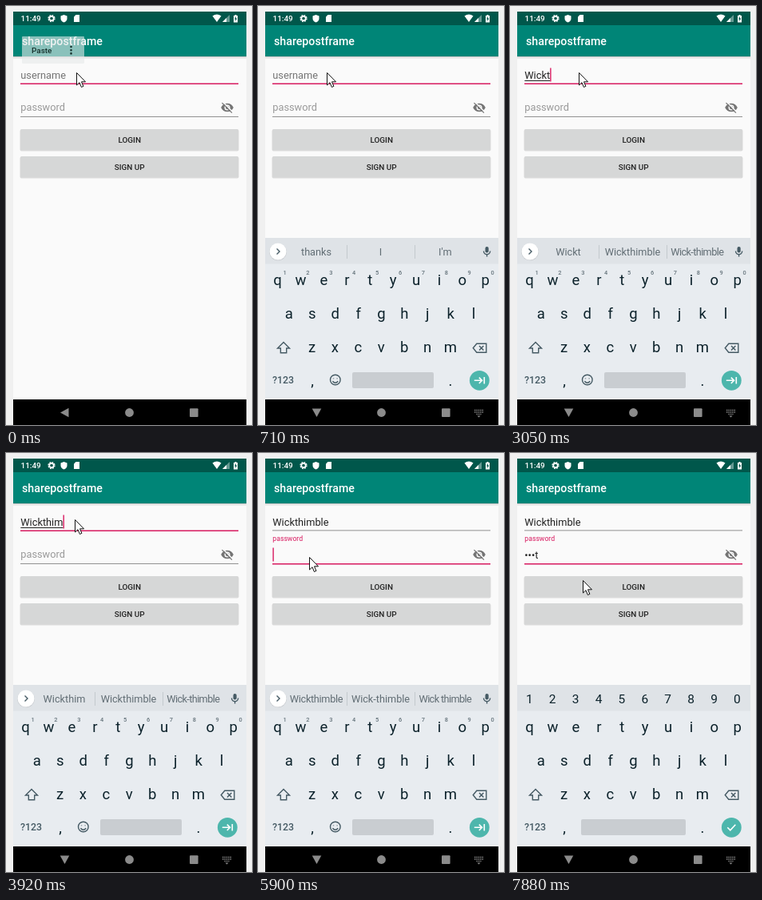
An HTML page that plays this animation: 308x524 px, repeating every 8 s.

```html
<!DOCTYPE html>
<html lang="en">
<head>
<meta charset="utf-8">
<title>Login screen</title>
<style>
  html, body { margin: 0; width: 100%; height: 100%; overflow: hidden; background: #f0f0f0; }
  svg { display: block; font-family: Roboto, sans-serif; }
  text { white-space: pre; }
  .field { font-size: 12.78px; fill: #212121; }
  .medium { font-size: 9.94px; font-weight: 500; }
  .mid { text-anchor: middle; }
  .key { font-size: 18.5px; fill: #0c222b; }
  .digit { font-size: 15.5px; fill: #0c222b; }
  .super { font-size: 7.4px; font-weight: 500; fill: #66747c; }
  .word { font-size: 12.7px; fill: #616d74; }
  .line { fill: none; stroke: #455a64; stroke-width: 1.4; }
</style>
</head>
<body>
<svg id="stage" width="308" height="524" viewBox="0 0 308 524">
  <rect x="9" y="7" width="292" height="517" fill="#fafafa"/>
  <rect x="9" y="63" width="292" height="1" fill="#000" opacity=".22"/>
  <rect x="9" y="64" width="292" height="2" fill="#000" opacity=".06"/>
  <rect x="9" y="24" width="292" height="39" fill="#008577"/>
  <rect x="9" y="7" width="292" height="17" fill="#00574b"/>

  <g fill="#fff">
    <text class="medium" x="18.5" y="19">11:49</text>
    <circle cx="57" cy="15.5" r="2.7" fill="none" stroke="#fff" stroke-width="1.7"/>
    <circle cx="57" cy="15.5" r="4" fill="none" stroke="#fff" stroke-width="1.3" stroke-dasharray="1.9 1.24"/>
    <path d="M72.5 11l4 1.5v3q0 3.500-4 5q-4-1.500-4-5v-3z"/>
    <path d="M87.500 11h4.500v9h-7v-6.500z"/>
    <path d="M258.500 12.500q5.500-4 11 0l-5.500 7.500z"/>
    <path d="M280 11v9h-9z" opacity=".4"/>
    <path d="M276 15v5h-5z"/>
    <path d="M285 12h1.500v-1h2v1h1.500v8.500h-5z"/>
    <path d="M288 13l-2 3.500h1.300v2.500l2-3.500h-1.300z" fill="#00574b"/>
    <text x="20" y="49" font-size="14.2" font-weight="500">sharepostframe</text>
  </g>

  <g id="popup">
    <rect x="20" y="38" width="78" height="34" rx="1" fill="#e6eae9" opacity=".6"/>
    <text class="medium" x="32" y="59" fill="#16302c">Paste</text>
    <path d="M81.500 51v.01M81.500 55.200v.01M81.500 59.400v.01" stroke="#16302c" stroke-width="2.600" stroke-linecap="round"/>
  </g>

  <text id="userHint" class="field" x="18.3" y="91" style="fill:#757575">username</text>
  <text id="user" class="field" x="18.3" y="91"></text>
  <rect id="composing" x="18.3" y="93" height="1" fill="#212121"/>
  <rect id="userLine" x="18" width="273"/>
  <text id="passHint" class="field">password</text>
  <text id="pass" class="field" x="18.3" y="131.500"></text>
  <rect id="passLine" x="18" width="273"/>
  <rect id="caret" width="1.4" height="17" fill="#d81b60"/>
  <g transform="translate(268.500 118.500) scale(.71)" fill="#757575">
    <path fill-rule="evenodd" d="M1 12C5 2 19 2 23 12C19 22 5 22 1 12ZM7 12a5 5 0 0 0 10 0a5 5 0 0 0-10 0Z"/>
    <circle cx="12" cy="12" r="3"/>
    <path d="M4.500 2.500L22 20" stroke="#fafafa" stroke-width="2"/>
    <path d="M2.800 3.700L20.300 21.300" stroke="#757575" stroke-width="1.900"/>
  </g>

  <g id="buttons"></g>

  <g id="keyboard">
    <rect x="9" y="290" width="292" height="202" fill="#e8ecf0"/>
    <rect x="9" y="290" width="292" height="32.500" fill="#dfe3e7"/>
    <g id="keys"></g>
    <g id="digits"></g>
    <g id="wordMode">
      <circle cx="25" cy="307.500" r="10.800" fill="#000" opacity=".1"/>
      <circle cx="25" cy="307" r="10.500" fill="#fff"/>
      <path class="line" d="M23.500 303.500l3.500 3.500l-3.500 3.500"/>
      <path d="M111.500 299v17M196.500 299v17" stroke="#c3cace"/>
      <rect x="284.500" y="301" width="4.200" height="7.500" rx="2.100" fill="#455a64"/>
      <path class="line" d="M282.500 306.500a4.100 4.100 0 0 0 8.200 0M286.600 310.500v3"/>
      <g id="words"></g>
      <g id="supers"></g>
      <circle class="line" cx="96.800" cy="467.500" r="6.300"/>
      <path class="line" d="M93.400 469.300q3.400 4 6.800 0M94.500 465.500v.8M99.100 465.500v.8"/>
    </g>
    <path id="shift" class="line" d="M32 420.500l7.500 7.500h-3.800v5.800h-7.400v-5.800h-3.800z"/>
    <path class="line" d="M269.300 427.700l4.500-5.500h12v11h-12zM277 425l5.400 5.400M282.400 425l-5.400 5.400"/>
    <text class="mid" x="31.500" y="472.300" font-size="12.300" font-weight="500" fill="#455a64">?123</text>
    <text class="key mid" x="68" y="474.700">,</text>
    <text class="key mid" x="241" y="474.700">.</text>
    <rect id="space" y="458" height="20" rx="2" fill="#c9cdd1"/>
    <circle cx="277.300" cy="468.300" r="12.400" fill="#4db6ac"/>
    <path id="action" fill="none" stroke="#fff" stroke-width="1.600" transform="translate(277.300 468.300)"/>
  </g>

  <rect x="9" y="492" width="292" height="32" fill="#000"/>
  <g fill="#8b8b8b">
    <path id="back" d="M-5.500 0L5-5.800V5.800Z"/>
    <circle cx="154.500" cy="508.500" r="5.400"/>
    <rect x="230" y="503.300" width="10.600" height="10.600" rx="1"/>
    <g id="imeIcon">
      <path d="M271 505.500h11M271 508h11M273.500 510.500h6" stroke="#8b8b8b" stroke-width="1.400" stroke-dasharray="1.400 1"/>
      <path d="M274.500 512.500h4l-2 2z"/>
    </g>
  </g>

  <path id="mouse" d="M0 0V15.500L3.500 12.200L5.900 18L8.400 16.900L6 11.300H11Z" fill="#fff" stroke="#111" stroke-linejoin="round"/>
</svg>

<script>
const LOOP = 8000;
const WORD = 'Wickthimble';
const WORD_TIMES = [2100, 2250, 2390, 2520, 3050, 3490, 3610, 3920, 4070, 4220, 4780];
const PASS = 'test';
const PASS_TIMES = [6630, 6750, 6880, 7150];
const FOCUS = 5630, DIGITS = 6050;
const PINK = '#d81b60', PITCH = 28.9;
const SUGGESTIONS = [
  ['thanks', 'I', "I'm"],
  ['W', 'We', 'What'],
  ['Wi', 'Will', 'With'],
  ['Wic', 'Wick', 'Wicked'],
  ['Wick', 'Wicked', 'Wicker']
];

const $ = id => document.getElementById(id);
const clamp = v => Math.max(0, Math.min(1, v));
const easeOut = v => 1 - (1 - clamp(v)) ** 2;
const mix = (a, b, p) => a + (b - a) * p;
const show = (id, on) => $(id).style.display = on ? '' : 'none';
const within = (t, a, b) => t >= a && t < b;

function set(id, attrs) {
  for (const name in attrs) $(id).setAttribute(name, attrs[name]);
}

function add(parent, tag, attrs, text = '') {
  const node = document.createElementNS('http://www.w3.org/2000/svg', tag);
  for (const name in attrs) node.setAttribute(name, attrs[name]);
  node.textContent = text;
  return $(parent).appendChild(node);
}

function setText(node, text) {
  if (node.textContent !== text) node.textContent = text;
}

[['LOGIN', 154], ['SIGN UP', 188]].forEach(([label, y]) => {
  add('buttons', 'rect', { x: 17.5, y: y + .5, width: 274, height: 27, rx: 2, opacity: .13 });
  add('buttons', 'rect', { x: 18, y, width: 273, height: 26, rx: 1.5, fill: '#d6d7d7' });
  add('buttons', 'text', { class: 'medium mid', x: 154.7, y: y + 16.8, fill: '#212121' }, label);
});

const letters = [];
[['qwertyuiop', 24.6, 348.7], ['asdfghjkl', 38.9, 390.7], ['zxcvbnm', 67.5, 433]].forEach(([row, x, y]) =>
  [...row].forEach((char, i) =>
    letters.push({ char, node: add('keys', 'text', { class: 'key mid', x: x + i * PITCH, y }) })));

[...'1234567890'].forEach((digit, i) => {
  const x = 24.3 + i * PITCH;
  add('digits', 'text', { class: 'digit mid', x, y: 313 }, digit);
  add('supers', 'text', { class: 'super mid', x: x + 9.2, y: 336 }, digit);
});

const words = [73, 153.5, 234.3].map(x => add('words', 'text', { class: 'word mid', x, y: 311.7 }));

function suggestionsFor(count) {
  if (count < 5) return SUGGESTIONS[count];
  const hyphened = 'Wick-thimble';
  return count < WORD.length
    ? [WORD.slice(0, count), WORD, hyphened]
    : [WORD, hyphened, 'Wick thimble'];
}

function mouseAt(t) {
  if (t < 150) return [88.5, 83.5];
  const down = easeOut((t - 5210) / 330), away = easeOut((t - 7680) / 200);
  return [mix(mix(86.5, 64.5, down), 91.5, away), mix(mix(83.5, 130.5, down), 159.5, away)];
}

function caretVisible(t) {
  return within(t, 860, 1260) || within(t, 1670, 6330) || within(t, 6630, 7610);
}

function underline(id, y, focused) {
  set(id, { y, height: focused ? 1.5 : .8, fill: focused ? PINK : '#777' });
}

function drawFields(t) {
  const count = WORD_TIMES.filter(at => t >= at).length;
  const passCount = PASS_TIMES.filter(at => t >= at).length;
  const focused = t >= FOCUS;

  show('popup', t < 150);
  show('userHint', !count);
  setText($('user'), WORD.slice(0, count));
  setText($('pass'), passCount ? '•'.repeat(passCount - 1) + PASS[passCount - 1] : '');
  const userWidth = count ? $('user').getComputedTextLength() : 0;
  const passWidth = passCount ? $('pass').getComputedTextLength() : 0;
  set('composing', { width: focused ? 0 : userWidth });
  underline('userLine', 96.5, !focused);
  underline('passLine', 138, focused);

  const float = easeOut((t - FOCUS) / 170);
  set('passHint', { transform: `translate(18.3 ${mix(131, 110.2, float)}) scale(${mix(1, .68, float)})` });
  $('passHint').style.fill = focused ? PINK : '#999';

  show('caret', caretVisible(t));
  set('caret', { x: 18.4 + (focused ? passWidth : userWidth), y: focused ? 118.5 : 77.5 });

  suggestionsFor(count).forEach((word, i) => {
    setText(words[i], word);
    const tight = i !== 1 && word.length > 10;
    words[i].style.letterSpacing = tight ? (10 - word.length) * .3 + 'px' : '0px';
  });
}

function drawKeyboard(t) {
  const rise = easeOut((t - 130) / 260);
  const caps = within(t, 1970, 2100);
  const digits = t >= DIGITS;

  set('keyboard', { opacity: rise, transform: `translate(0 ${mix(45, 0, rise)})` });
  set('back', { transform: `translate(73.5 508.500) rotate(${-90 * rise})` });
  show('imeIcon', rise > .5);
  letters.forEach(({ char, node }) => setText(node, caps ? char.toUpperCase() : char));
  $('shift').style.fill = caps ? '#455a64' : 'none';
  show('wordMode', !digits);
  show('digits', digits);
  set('space', digits ? { x: 89, width: 131 } : { x: 118, width: 102 });
  set('action', { d: digits ? 'M-5 0L-1.500 3.500L5-3.500' : 'M-6.500 0H3M-.500-3.700L3.200 0L-.500 3.700M6-4.200V4.200' });
}

function draw(now) {
  const t = now % LOOP;
  drawFields(t);
  drawKeyboard(t);
  set('mouse', { transform: `translate(${mouseAt(t)})` });
  requestAnimationFrame(draw);
}
requestAnimationFrame(draw);
</script>
</body>
</html>
```
